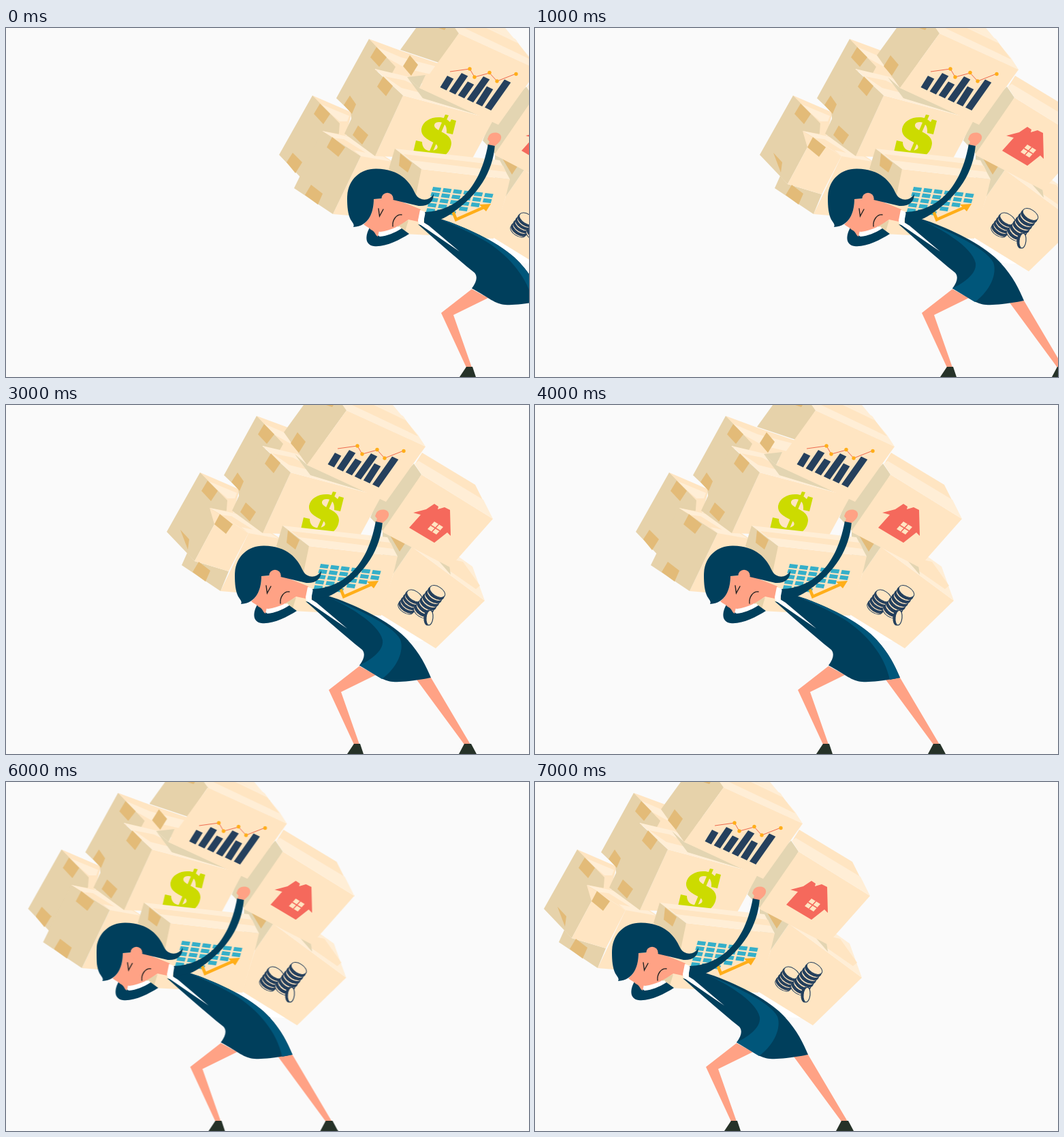
These frames come from a looping animation (768 by 512 pixels, 8 s). An HTML page:

```html
<!DOCTYPE html>
<html lang="en">
<head>
<meta charset="utf-8">
<title>Heavy load</title>
<style>
  html, body { margin: 0; width: 100%; height: 100%; overflow: hidden; background: #fafafa; }
  svg { display: block; width: 768px; height: 512px; }
  .front { fill: #ffe5c2; }
  .top { fill: #ffeed6; }
  .side { fill: #e6d2aa; }
  .shade { fill: #e3d5b2; }
  .tape { fill: #e3bb78; }
  .navy { fill: #003f5c; }
  .blue { fill: #00567a; }
  .skin { fill: #ffa285; }
  .ink { fill: #25405d; }
  .white { fill: #fff; }
  .shoe { fill: #263228; }
  .red { fill: #f5695c; }
  .orange { fill: #ffae19; }
  .line { fill: none; stroke-width: 1.4; stroke: #222; stroke-linecap: round; }
</style>
</head>
<body>
<svg viewBox="0 0 768 512">
<g id="walker">

  <g id="backBoxes">
    <path class="front" d="M62 99L120 124L110 160L90 150Z"/>
    <path class="top" d="M75 112L116 129L113 137L102 137L88 125Z"/>
    <path class="side" d="M62 99L102 140L100 165L83 175L54 229L13 186Z"/>
    <path class="tape" d="M73 111L88 126L78 141L64 126Z"/>
    <path class="tape poseA" d="M33 183L47 197L37 213L24 197Z"/>
    <path class="tape poseB" d="M33 183L46 197L44 212Z"/>

    <path class="front" d="M76 151L125 160L180 196L175 280L92 273L133 188Z"/>
    <path class="top" d="M76 151L122 161L178 196L133 188L118 175Z"/>
    <path class="front" d="M89 161L108 163L140 183L122 179Z"/>
    <path class="side poseA" d="M76 151L133 188L92 273L35 235Z"/>
    <g class="poseB">
      <path class="side" d="M43 217L54 229L104 244L92 273L35 235Z"/>
      <path class="front" d="M76 151L133 188L104 244L54 229L83 175Z"/>
    </g>
    <path class="tape" d="M91 160L110 175L100 189L83 175Z"/>
    <path class="tape" d="M60 230L77 243L70 259L51 245Z"/>
  </g>

  <g id="middleBoxes">
    <path class="front" d="M145 16L191 33L250 53L225 95L154 62L166 45Z"/>
    <path class="top" d="M157 28L192 43L250 58L236 68L201 60L170 43Z"/>
    <path class="side" d="M145 16L184 57L178 68L154 60L120 140L118 123L97 103Z"/>
    <path class="tape" d="M156 28L171 43L160 57L147 43Z"/>
    <path class="tape" d="M117 99L126 112L120 126L108 113Z"/>
  </g>

  <g id="houseBox">
    <path class="shade" d="M376 86L387 102L335 190L312 165L323 138Z"/>
    <path class="front" d="M373 208L480 287L408 357L327 307L346 247Z"/>
    <path class="top" d="M400 208L441 222L462 237L480 287L373 208Z"/>
    <path class="front" d="M430 226L448 230L473 265L467 270L428 243Z"/>
    <path class="shade" d="M410 226L428 235L430 249Z"/>
    <path class="shade" d="M330 185L373 208L346 247L330 230Z"/>
    <path class="tape" d="M340 190L363 203L355 215Z"/>
    <path class="front" d="M387 102L492 167L429 238L329 186Z"/>
    <path class="front" d="M388 70L466 117L479 143L378 86Z"/>
    <path class="top" d="M377 86L383 82L478 139L492 167L387 102Z"/>
    <path class="red" d="M375 158L394 153L406 145L412 149L411 153L421 150L429 154L430 192L425 187L406 202L369 180L386 161Z"/>
    <path class="front" d="M406 171L419 179L409 190L396 182Z"/>
    <path d="M412.5 175L402.5 186M401 176.500L414 184.500" stroke="#f5695c" stroke-width="1.6"/>
  </g>

  <g id="coins"></g>

  <g id="moneyBox">
    <path class="front" d="M195 99L328 134L296 193L154 188Z"/>
    <path class="top" d="M154 60L205 72L320 132L195 99Z"/>
    <path class="front" d="M168 71L198 77L245 101L193 88Z"/>
    <path class="side" d="M153 60L195 99L154 188L109 155Z"/>
    <path class="tape" d="M166 71L180 85L170 100L157 86Z"/>
    <path class="tape" d="M129 143L144 157L135 171L121 157Z"/>
    <path class="shade" d="M201 72L219 88L313 130L224 103Z"/>
    <g fill="#ccdb00">
      <path d="M214 165L223 167C223 176 229 181 237 180C246 179 248 174 243 170C233 164 221 160 222 148C224 136 237 130 250 131C257 132 261 135 264 138L266 134L273 136L268 156L259 154C260 143 255 138 248 138C241 138 239 143 243 147C250 153 266 156 266 169C265 182 255 192 240 191C231 191 225 188 221 183L219 185L210 182Z"/>
      <path d="M257 127L262 128L235 190L230 190Z"/>
    </g>
  </g>

  <g id="chartBox">
    <path class="top" d="M277 8L243 -40L330 -18L382 44L393 61Z"/>
    <path class="side poseB" d="M243 -40L277 8L219 88L185 40Z"/>
    <g class="poseA">
      <path class="side" d="M243 -40L277 8L248 51L191 32Z"/>
      <path class="shade" d="M201 72L228 69L219 88Z"/>
    </g>
    <path class="tape" d="M205 40L217 54L207 70L195 56Z"/>
    <path class="tape" d="M247 0L258 0L256 3Z"/>
    <path class="front" d="M277 8L393 61L335 142L219 88Z"/>
    <path class="front" d="M282 -10L320 -2L360 17L382 46L285 0Z"/>
    <path class="top" d="M314 -4L360 16L365 23L317 0Z"/>
    <g id="bars"></g>
    <path d="M264 64L293 60L300 72L322 66L333 78L361 67" fill="none" stroke="#ee6a4d"/>
    <g id="dots" class="orange"></g>
  </g>

  <g id="calendarBox">
    <path class="front" d="M222 207L352 222L346 247L328 309L197 302L188 288Z"/>
    <path class="top" d="M183 177L337 194L352 222L222 207Z"/>
    <path class="front" d="M196 185L342 202L346 211L207 194Z"/>
    <path class="side" d="M183 177L222 207L212 255L174 207Z"/>
    <path class="tape" d="M191 184L208 198L202 212L189 202Z"/>
    <path class="side" d="M186 290L203 282L197 302Z"/>
    <g id="days" fill="#35afc9"></g>
    <path d="M268.500 270L273 281L314 263" fill="none" stroke="#ffae19" stroke-width="4.5"/>
    <path class="orange" d="M324 258L317 269L307 259Z"/>
  </g>

  <g id="woman">
    <path class="white" d="M160 302L190 291L196 298L165 308ZM328 308L390 346L365 345L330 318Z"/>
    <path class="skin" d="M296 383L320 396L269 421L296 498L288 498L251 418ZM380 403L401 400L459 498L450 498Z"/>
    <path class="shoe" d="M288 497L297 497L302 512L278 512ZM450 497L460 497L468 512L442 512Z"/>

    <path class="navy" d="M146 293C140 303 138 318 152 320C168 322 190 311 204 302L193 294C182 301 172 305 161 306C155 304 158 298 154 295Z"/>
    <path class="skin" d="M142 290L160 297L158 306C154 304 154 298 148 296Z"/>
    <path class="skin" d="M152 251L181 250L221 266L217 284L203 281C190 290 178 297 162 299C152 298 145 294 137 288C147 280 152 268 152 251Z"/>
    <path class="navy" d="M122 292C124 288 121 286 118 281C114 273 113 262 113 250C113 223 132 206 156 206.500C190 207 205 225 213 243C219 255 235 254 240 243C240 256 231 262 218 261L180 252L165 250L152 251C152 270 145 291 122 292Z"/>
    <circle class="skin" cx="172" cy="250.500" r="8.700"/>
    <path class="line" d="M159 265L160.500 276L166 266M180 291C179 282 185 273 193 274"/>

    <path class="navy" d="M226 270L250 280C285 291 332 313 358 336C382 358 393 381 401 400C380 404 360 407 345 406C330 405 322 396 296 382C303 373 305 365 300 359C270 335 240 308 217 288L226 290Z"/>
    <path class="blue poseA" d="M248 280C285 291 332 313 358 336C382 358 393 381 401 400L386 403C378 365 350 335 320 315C300 303 275 291 248 280Z"/>
    <path class="blue poseB" d="M246 280C275 292 325 320 330 345C332 362 310 375 296 382L329 402C352 385 362 360 356 344C345 322 290 298 246 280Z"/>
    <path class="white" d="M220 267L228 270L225 285L233 290L278 328L218 287L217 282Z"/>
    <path class="navy" d="M227 270C262 269 306 248 320 170L330 171C327 212 305 245 269 270C262 275 257 278 250 281L232 284Z"/>
    <path class="skin" d="M320 171L322 167L319 163L321 158C325 152 337 152 339 159C340 165 335 169 330 173Z"/>
  </g>
</g>
</svg>
<script>
const NS = "http://www.w3.org/2000/svg";
const $ = id => document.getElementById(id);

function add(parent, tag, attrs) {
  const node = document.createElementNS(NS, tag);
  for (const key in attrs) node.setAttribute(key, attrs[key]);
  parent.append(node);
}

// Chart: bars stand on a sloping baseline, each given by the left corner of its top.
[[260, 70], [281, 66], [290, 78.5], [313, 71], [318, 85.5], [344, 75.5]].forEach(([x, y], i) => {
  const bx = 249.5 + i * 13.1, by = 87 + i * 5.9;
  add($("bars"), "path", {
    class: "ink",
    d: `M${x} ${y}l9.300 4.500L${bx + 9.3} ${by + 4.5}L${bx} ${by}Z`
  });
});
[[293, 60], [300, 72], [322, 65.5], [333, 78], [361, 67.5]].forEach(([cx, cy]) =>
  add($("dots"), "circle", { cx, cy, r: 2.7 }));

// Calendar: number of rows in each column.
[5, 5, 5, 4, 3, 2].forEach((rows, col) => {
  for (let row = 0; row < rows; row++) {
    const x = 239.2 + col * 15.3 - row * 2.2, y = 233 + col * 1.8 + row * 7.8;
    add($("days"), "path", { d: `M${x} ${y}l12 1.400l-1.700 5.700l-12-1.400z` });
  }
});

function coin(x, y, rx, ry, angle, fill, width = 1.2) {
  add($("coins"), "ellipse", {
    cx: x, cy: y, rx, ry, fill, stroke: "#25405d", "stroke-width": width,
    transform: `rotate(${angle} ${x} ${y})`
  });
}

function stack(x0, y0, x1, y1, count) {
  for (let i = 0; i <= count * 2; i++) {
    const k = i / (count * 2);
    coin(x0 + (x1 - x0) * k, y0 + (y1 - y0) * k, 12.5, 7, 32, i % 2 ? "#25405d" : "#ffe5c2", i % 2 ? 2 : 1);
  }
}
stack(364, 298, 377, 280, 4);
stack(387, 304, 410.5, 273.5, 6);
coin(396.5, 312, 5.5, 11, 4, "#25405d");
coin(399, 312, 5, 11, 6, "#ffe5c2");

// One hard step per second; the two poses alternate.
const stops = [388, 317, 262, 223, 135, 48, 19.5, 0];
const timing = { duration: 8000, iterations: Infinity };
const hold = values => values.concat(values.at(-1)).map((value, i) =>
  ({ ...value, offset: i / stops.length, easing: "steps(1, end)" }));
const pose = parity => hold(stops.map((_, i) => ({ opacity: i % 2 === parity ? 1 : 0 })));

$("walker").animate(hold(stops.map(x => ({ transform: `translate(${x}px, 0px)` }))), timing);
["poseA", "poseB"].forEach((name, parity) =>
  document.querySelectorAll("." + name).forEach(el => el.animate(pose(parity), timing)));
</script>
</body>
</html>
```
